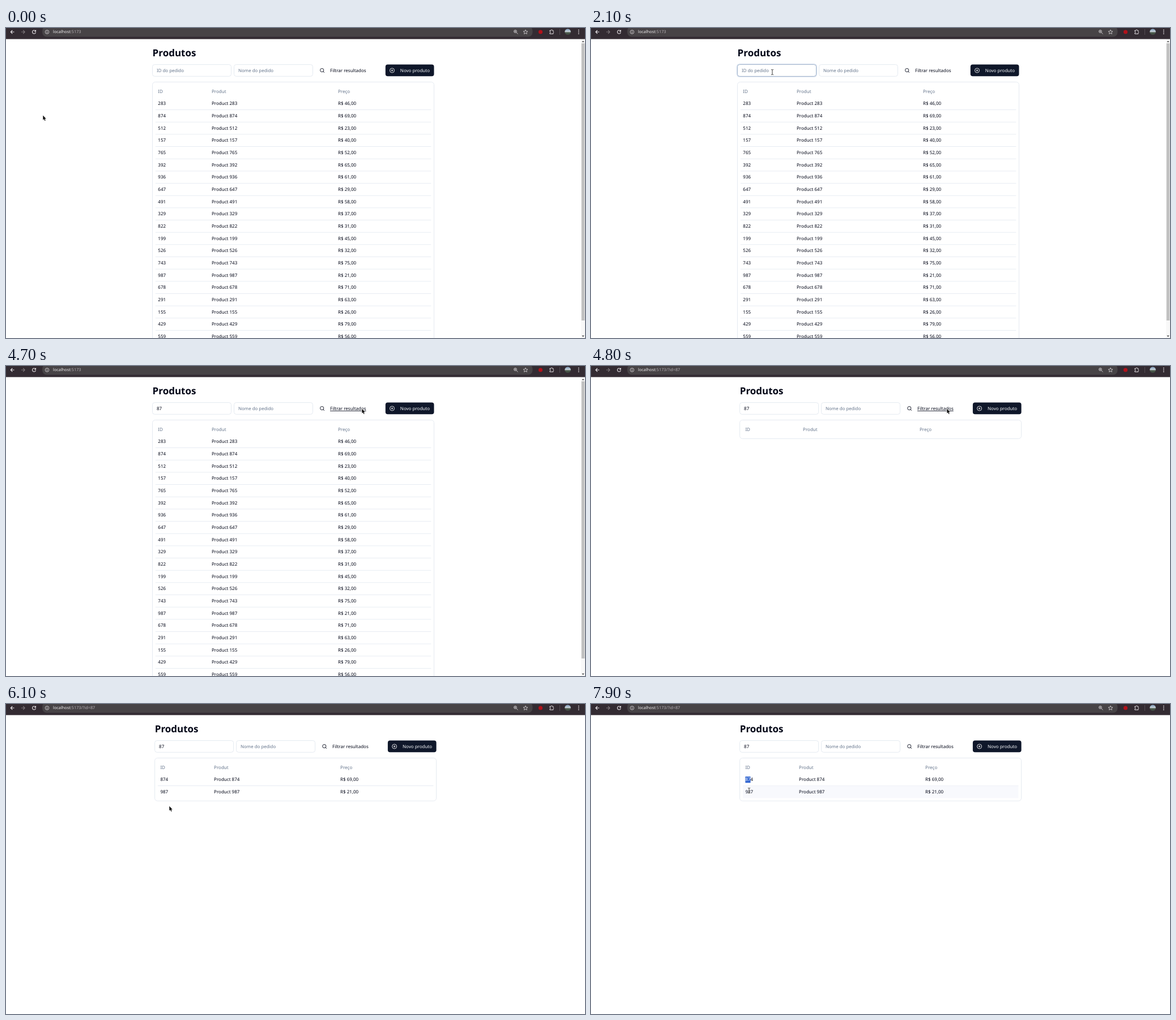
Recreate the animation shown at these times as an HTML page with a canvas. Size 1022 by 548 pixels, loop 8000 ms.

```html
<!DOCTYPE html>
<html lang="pt-BR">
<head>
<meta charset="utf-8">
<title>Produtos</title>
<style>
html, body { margin: 0; width: 100%; height: 100%; overflow: hidden; background: #fff; }
canvas { display: block; width: 1022px; height: 548px; }
</style>
</head>
<body>
<canvas id="stage"></canvas>
<script>
const W = 1022, H = 548, LOOP = 8000, STEP = 100;
const canvas = document.getElementById('stage');
const ctx = canvas.getContext('2d');
const ratio = window.devicePixelRatio || 1;
canvas.width = W * ratio;
canvas.height = H * ratio;

const FONT = '"Ubuntu", "Noto Sans", "Open Sans", sans-serif';
const INK = '#020617', MUTED = '#64748b', LINE = '#e2e8f0', NAVY = '#0f172a';
const ROW_Y = 133.6, ROW_H = 21.66;

const products = [
  [283, 46], [874, 69], [512, 23], [157, 40], [765, 52], [392, 65], [936, 61],
  [647, 29], [491, 58], [329, 37], [822, 31], [199, 45], [526, 32], [743, 75],
  [987, 21], [678, 71], [291, 63], [155, 26], [429, 79], [559, 56]
];
const matches = products.filter(p => String(p[0]).includes('87') || p[0] === 874);
const found = matches.slice(0, 2);

// Pointer path: time, x, y
const path = [
  [0, 65, 155], [200, 70, 152], [600, 70, 152], [700, 74, 158], [800, 96, 164],
  [900, 140, 160], [1000, 200, 140], [1100, 258, 112], [1200, 300, 90],
  [1300, 319, 80], [1400, 320, 78], [3300, 320, 78], [3400, 319, 79],
  [3600, 319, 79], [3700, 340, 88], [3800, 396, 104], [3900, 447, 111],
  [4000, 502, 113], [4200, 592, 96], [4300, 618, 82], [4500, 628, 76],
  [4800, 628, 76], [4900, 622, 84], [5100, 588, 120], [5400, 543, 160],
  [5600, 470, 190], [5800, 375, 195], [6000, 304, 187], [6100, 288, 181],
  [6300, 272, 161], [6600, 272, 136], [6700, 273, 134], [7100, 280, 134],
  [7300, 280, 134], [7600, 283, 140], [7900, 279, 153]
];

function pointerAt(t) {
  let i = 1;
  while (i < path.length - 1 && path[i][0] < t) i++;
  const a = path[i - 1], b = path[i];
  const k = Math.min(1, (t - a[0]) / (b[0] - a[0]));
  return { x: a[1] + (b[1] - a[1]) * k, y: a[2] + (b[2] - a[2]) * k };
}

function text(str, x, y, color = INK, weight = 500, size = 8) {
  ctx.font = `${weight} ${size}px ${FONT}`;
  ctx.fillStyle = color;
  ctx.fillText(str, x, y + size * 0.357);
  return ctx.measureText(str).width;
}

function rect(x, y, w, h, color) {
  ctx.fillStyle = color;
  ctx.fillRect(x, y, w, h);
}

function box(x, y, w, h, r, fill, stroke, width = 1) {
  ctx.beginPath();
  ctx.roundRect(x, y, w, h, r);
  if (fill) { ctx.fillStyle = fill; ctx.fill(); }
  if (stroke) { ctx.strokeStyle = stroke; ctx.lineWidth = width; ctx.stroke(); }
}

function circle(x, y, r, fill, stroke, width = 1) {
  ctx.beginPath();
  ctx.arc(x, y, r, 0, Math.PI * 2);
  if (fill) { ctx.fillStyle = fill; ctx.fill(); }
  if (stroke) { ctx.strokeStyle = stroke; ctx.lineWidth = width; ctx.stroke(); }
}

function stroke(d, color, width = 1, x = 0, y = 0) {
  ctx.save();
  ctx.translate(x, y);
  ctx.strokeStyle = color;
  ctx.lineWidth = width;
  ctx.stroke(new Path2D(d));
  ctx.restore();
}

function star(x, y, r) {
  ctx.beginPath();
  for (let i = 0; i < 10; i++) {
    const a = -Math.PI / 2 + i * Math.PI / 5, q = i % 2 ? r * 0.45 : r;
    ctx.lineTo(x + q * Math.cos(a), y + q * Math.sin(a));
  }
  ctx.closePath();
  ctx.strokeStyle = '#dcd8db';
  ctx.lineWidth = 0.8;
  ctx.stroke();
}

function browserBar(query) {
  const icon = '#e8e4e7';
  rect(0, 0, W, 19.6, '#332b32');
  box(64, -3, 865.5, 18.5, 8, '#474346');
  stroke('M3.2 0H-3M0-3L-3 0L0 3', icon, 1.1, 11.3, 7);
  stroke('M-3.2 0H3M0-3L3 0L0 3', '#7d767b', 1.1, 30.2, 7);
  stroke('M2.6-1.6A3 3 0 1 0 3 .6M3-3.4V-1H.6', icon, 1.1, 49.5, 7);
  circle(72.5, 7, 3.3, null, icon, 0.8);
  rect(72.1, 6.5, 0.9, 2.4, icon);
  rect(72.1, 4.9, 0.9, 0.9, icon);
  const w = text('localhost', 83, 6.8, '#f1eef0', 400, 7.3);
  text(':5173' + query, 83 + w, 6.8, '#b7b1b5', 400, 7.3);

  circle(899, 6, 2.4, null, icon, 0.8);
  stroke('M1 1L3.6 3.6M-2.2-1H.2M-1-2.2V.2', icon, 0.8, 900, 7);
  star(917, 7.2, 4.1);
  circle(943.5, 7, 3.6, '#b1121b');
  stroke('M-3.3-2.2H-1.2A1.2 1.2 0 0 1 1.2-2.2H2.7V0A1.2 1.2 0 0 1 2.7 2.2V3.8H-3.3V2.2A1.3 1.3 0 0 0-3.3-.4Z', icon, 1, 963.2, 6.5);
  rect(977, 2, 0.8, 10, '#5d555b');
  const sky = ctx.createLinearGradient(0, 1.5, 0, 12.5);
  sky.addColorStop(0, '#7f9dbd');
  sky.addColorStop(0.45, '#c4ced5');
  sky.addColorStop(0.6, '#4c5b4c');
  sky.addColorStop(1, '#3d4740');
  circle(991.6, 6.8, 5.3, sky);
  for (const y of [3.7, 6.9, 10.1]) circle(1010.8, y, 0.9, icon);
}

function scrollbar() {
  rect(1015, 19.6, 7, H, '#f8f8f8');
  rect(1015.8, 27, 5.6, 490, '#c1c1c1');
  ctx.fillStyle = '#555';
  ctx.fill(new Path2D('M1016.4 25L1018.6 22.4L1020.8 25Z'));
  ctx.fill(new Path2D('M1016.4 543.6L1018.6 546.2L1020.8 543.6Z'));
}

function field(x, focused) {
  if (focused) {
    box(x - 0.4, 64.2, 139.8, 21.6, 4.5, null, '#d7e1ef', 2.6);
    box(x, 64.6, 139, 20.8, 4, '#fff', '#9fb0c9', 0.9);
  } else {
    box(x, 64.6, 139, 20.8, 4, '#fff', LINE, 0.9);
  }
}

function toolbar(t, underline) {
  text('Produtos', 258.6, 44.2, INK, 700, 17);
  field(258.5, t >= 1600 && t < 4600);
  field(402.5, false);
  const typed = t < 2800 ? '' : t < 2900 ? '8' : '87';
  const w = typed ? text(typed, 266, 75, INK, 400) : 0;
  if (!typed) text('ID do pedido', 266, 75, MUTED, 400, 7.9);
  const caret = (t >= 1600 && t < 2100) || (t >= 2800 && t < 3700) || (t >= 4200 && t < 4600);
  if (caret) rect(266 + w, 70, 0.8, 10, INK);
  text('Nome do pedido', 410, 75, MUTED, 400, 7.9);

  circle(557.7, 74.6, 3.1, null, INK, 0.9);
  stroke('M0 0L2 2', INK, 0.9, 560, 76.9);
  const lw = text('Filtrar resultados', 572, 74.8);
  if (underline) rect(572, 79, lw, 0.8, INK);

  box(669.8, 64.5, 85.7, 20.8, 4, NAVY);
  circle(681.5, 75, 4, null, '#fff', 0.85);
  stroke('M-1.8 0H1.8M0-1.8V1.8', '#fff', 0.85, 681.5, 75);
  text('Novo produto', 695.8, 74.8, '#f8fafc');
}

function table(rows, pointer, picked) {
  const n = rows.length;
  const height = n ? 33 + n * ROW_H - 0.5 : 33;
  box(258.5, 95.5, 497, height, 5, '#fff', LINE, 0.9);
  const cols = n ? [268.3, 363, 586] : [268.3, 370, 575.8];
  ['ID', 'Produt', 'Preço'].forEach((h, i) => text(h, cols[i], 112, MUTED));
  rows.forEach(([id, price], i) => {
    const y = ROW_Y + i * ROW_H, top = y - 10.7;
    const over = pointer.x > 264 && pointer.x < 750 && pointer.y >= top && pointer.y < top + ROW_H;
    if (over) rect(263.8, top, 486.5, ROW_H, '#f8f9fd');
    if (i < n - 1) rect(263.8, y + 10.6, 486.5, 0.8, LINE);
    text(String(id), cols[0], y);
    text('Product ' + id, cols[1], y);
    text(`R$ ${price},00`, cols[2], y);
    if (i === 0 && picked) {
      const w = ctx.measureText(String(id).slice(0, picked)).width;
      rect(cols[0], y - 5.3, w, 11, '#2f64d0');
      text(String(id).slice(0, picked), cols[0], y, '#fff');
    }
  });
}

function arrow(x, y) {
  ctx.save();
  ctx.translate(x, y);
  const shape = new Path2D('M.3-.6V7.6L2.1 6L3.4 9L4.7 8.4L3.4 5.5H5.8Z');
  ctx.lineJoin = 'round';
  ctx.strokeStyle = '#fff';
  ctx.lineWidth = 1.3;
  ctx.stroke(shape);
  ctx.fillStyle = '#111';
  ctx.fill(shape);
  ctx.restore();
}

function beam(x, y) {
  const d = 'M-2-4.6Q-.2-4.6 0-3.6Q.2-4.6 2-4.6M0-3.6V3.6M-2 4.6Q-.2 4.6 0 3.6Q.2 4.6 2 4.6';
  stroke(d, 'rgba(255,255,255,.75)', 2, x, y);
  stroke(d, '#222', 0.9, x, y);
}

function draw(t) {
  const pointer = pointerAt(t);
  const filtered = t >= 4800;
  const shift = filtered ? 4.1 : 0;
  const local = { x: pointer.x - shift, y: pointer.y };
  const inBar = local.y > 64 && local.y < 86;
  const rows = !filtered ? products : t < 5700 ? [] : found;
  const picked = t < 6800 ? 0 : t < 7000 ? 1 : 2;

  ctx.setTransform(ratio, 0, 0, ratio, 0, 0);
  ctx.textRendering = 'geometricPrecision';
  ctx.textBaseline = 'alphabetic';
  rect(0, 0, W, H, '#fff');
  ctx.save();
  ctx.translate(shift, 0);
  toolbar(t, inBar && local.x > 548 && local.x < 645);
  table(rows, local, picked);
  ctx.restore();
  if (!filtered) scrollbar();
  browserBar(filtered ? '/?id=87' : '');

  const onField = inBar && local.x > 258 && local.x < 398;
  (onField || t >= 6300 ? beam : arrow)(pointer.x, pointer.y);
}

const start = performance.now();
function tick(now) {
  const t = Math.max(0, now - start) % LOOP;
  draw(Math.floor(t / STEP) * STEP);
  requestAnimationFrame(tick);
}
draw(0);
requestAnimationFrame(tick);
</script>
</body>
</html>
```
